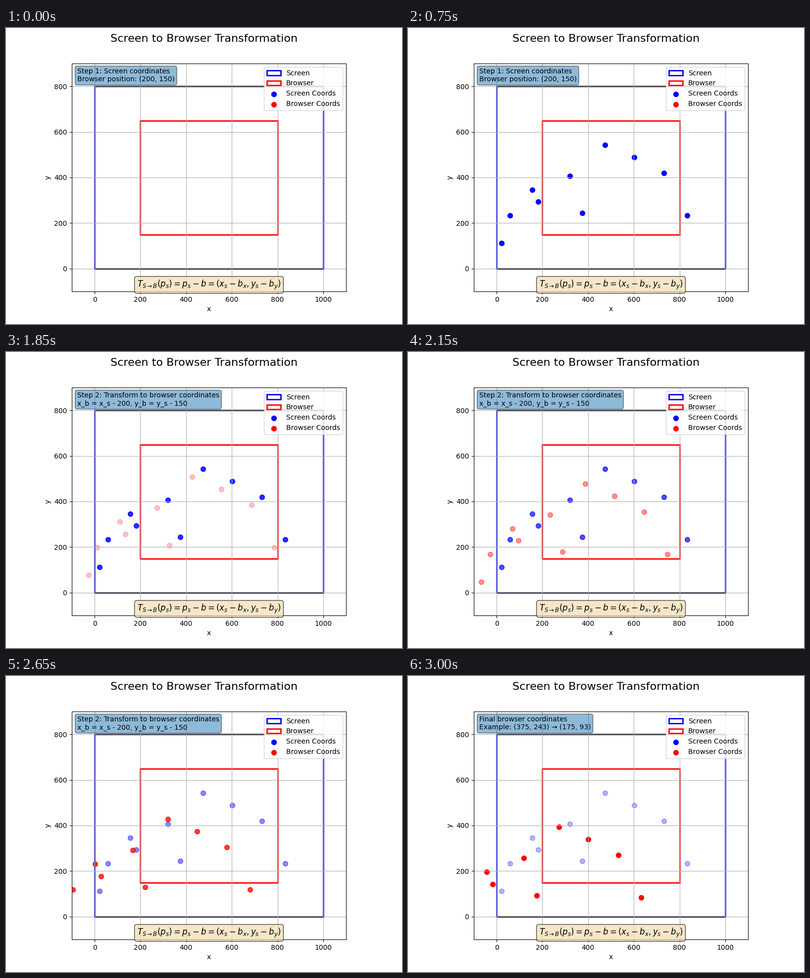
Write a matplotlib script that moves like this. It is 800 px wide and 600 px high and loops after 4500 ms.

```python
import numpy as np
import matplotlib.pyplot as plt
from matplotlib.animation import FuncAnimation
from matplotlib.patches import Rectangle

FRAMES, INTERVAL = 90, 50
FADE_END, MOVE_START, MOVE_END = 15, 30, 60
SCREEN = np.array([1000, 800])
CORNER = np.array([200, 150])
BROWSER = np.array([600, 500])

STEPS = (
    "Step 1: Screen coordinates\nBrowser position: (200, 150)",
    "Step 2: Transform to browser coordinates\nx_b = x_s - 200, y_b = y_s - 150",
    "Final browser coordinates\nExample: (375, 243) → (175, 93)",
)


def make_points():
    """Eight points on the screen, then two inside the browser window."""
    rng = np.random.RandomState(42)
    x = rng.rand(8, 2)[:, 0]
    y = rng.rand(8)
    outer = np.column_stack([x, y]) * SCREEN
    inner = CORNER + rng.rand(2, 2) * BROWSER
    return np.vstack([outer, inner])


points = make_points()

fig, ax = plt.subplots(figsize=(8, 6), dpi=100)
fig.suptitle("Screen to Browser Transformation", fontsize=16)
ax.set_xlim(-100, 1100)
ax.set_ylim(-100, 900)
ax.set_aspect("equal")
ax.set_xlabel("x")
ax.set_ylabel("y")
ax.grid(True)


def add_window(corner, size, color, label):
    ax.add_patch(Rectangle(corner, *size, fill=False, edgecolor=color,
                           linewidth=2, label=label))


add_window((0, 0), SCREEN, "blue", "Screen")
add_window(CORNER, BROWSER, "red", "Browser")
# The screen's top and bottom edges are dark
for level in (0, SCREEN[1]):
    ax.plot([0, SCREEN[0]], [level, level], color="black", linewidth=2,
            solid_capstyle="butt", zorder=1.1)

screen_dots = ax.scatter([], [], c="blue", s=50, label="Screen Coords")
browser_dots = ax.scatter([], [], c="red", s=50, label="Browser Coords")
ax.legend(loc="upper right")

caption = ax.text(0.02, 0.98, "", transform=ax.transAxes, va="top",
                  bbox=dict(boxstyle="round", alpha=0.5))
ax.text(0.5, 0.02, r"$T_{S \to B}(p_s) = p_s - b = (x_s - b_x, y_s - b_y)$",
        transform=ax.transAxes, ha="center", fontsize=12,
        bbox=dict(boxstyle="round", facecolor="wheat", alpha=0.7))


def update(frame):
    fade = min(frame / FADE_END, 1)
    move = np.clip((frame - MOVE_START) / (MOVE_END - MOVE_START), 0, 1)

    screen_dots.set_offsets(points)
    screen_dots.set_alpha(fade * (1 - 0.7 * move))
    browser_dots.set_offsets(points - move * CORNER)
    browser_dots.set_alpha(move)
    caption.set_text(STEPS[(frame >= MOVE_START) + (frame >= MOVE_END)])
    return screen_dots, browser_dots, caption


anim = FuncAnimation(fig, update, frames=FRAMES, interval=INTERVAL,
                     repeat=True, repeat_delay=0, blit=False)
plt.show()
```
